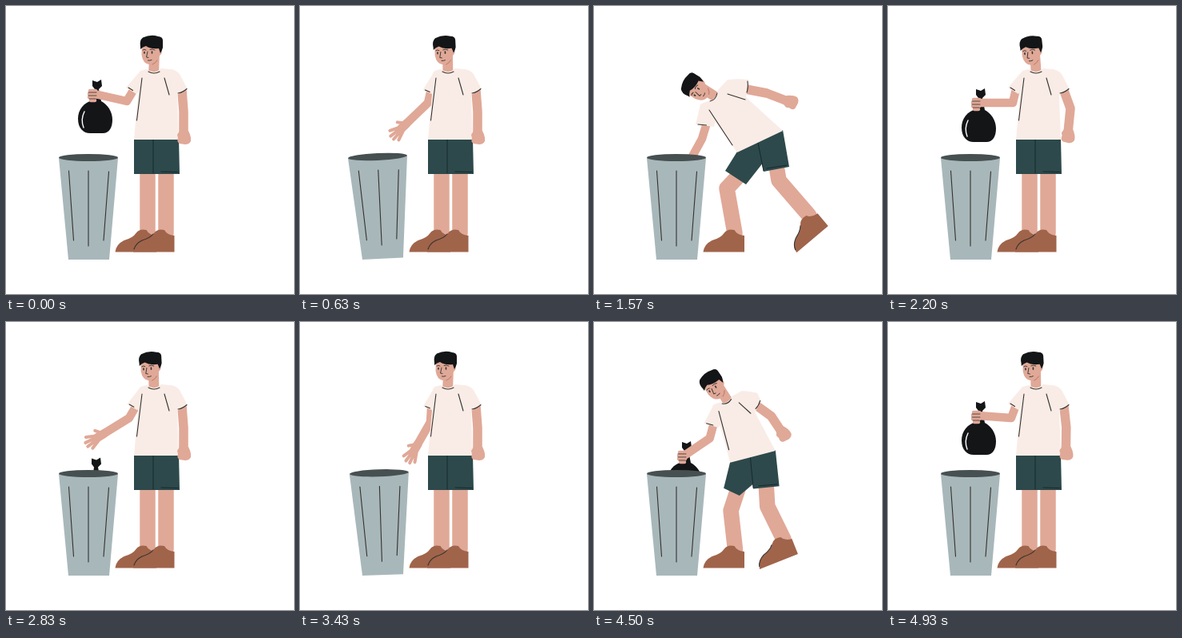
Write an HTML page with a canvas that moves like this. It is 360x360 px and loops after 5 s.

```html
<!DOCTYPE html>
<html lang="en">
<head>
<meta charset="utf-8">
<title>Taking out the rubbish</title>
<style>
  html, body { margin: 0; height: 100%; overflow: hidden; background: #fff; }
  canvas { display: block; }
</style>
</head>
<body>
<canvas width="360" height="360"></canvas>
<script>
const ctx = document.querySelector('canvas').getContext('2d');
const CYCLE = 2500, RELEASE = 180, FALL = 180, GRAB = 1700;
const SKIN = '#e0a897', SHIRT = '#f9ece6', SHORTS = '#2d494b', SHOE = '#a0644a',
      BIN = '#a8b7ba', RIM = '#465051', INK = '#35322f', BLACK = '#131517';

const numbers = s => String(s).match(/-?[\d.]+/g).map(Number);

// Blend two strings that differ only in their numbers.
const mix = (a, b, k) => {
  const to = numbers(b);
  let i = 0;
  return String(a).replace(/-?[\d.]+/g, n => (+n + (to[i++] - n) * k).toFixed(2));
};

// Eased value at time t from [time, value] keys.
const track = (t, keys) => {
  const i = keys.findIndex(key => key[0] > t);
  if (i < 0) return keys[keys.length - 1][1];
  if (i === 0) return keys[0][1];
  const [t0, a] = keys[i - 1], [t1, b] = keys[i];
  const u = (t - t0) / (t1 - t0);
  return mix(a, b, u * u * (3 - 2 * u));
};

const fill = (d, color) => {
  ctx.fillStyle = color;
  ctx.fill(new Path2D(d));
};
const line = (d, color = INK, width = 1.1) => {
  ctx.strokeStyle = color;
  ctx.lineWidth = width;
  ctx.stroke(new Path2D(d));
};
const at = (x, y, degrees, draw) => {
  ctx.save();
  ctx.translate(x, y);
  ctx.rotate(degrees * Math.PI / 180);
  draw();
  ctx.restore();
};

// Tip of a limb path and the direction of its last bone (0 = straight down).
const tip = limb => {
  const [ex, ey, x, y] = numbers(limb).slice(-4);
  return [x, y, Math.atan2(ex - x, y - ey) * 180 / Math.PI];
};

const bendKeys = [[1330, 0], [1520, 1.07], [1580, 1], [1840, 1], [2180, 0]];
const headKeys = [[0, 0], [300, -3], [630, -3], [930, 0], [1600, 0], [1800, -6], [2200, -6], [2430, -3], [2500, 0]];
const hipArmKeys = [
  [0, 'M220 106 L222 132 L222 160'], [1600, 'M220 106 L222 132 L222 160'],
  [1800, 'M220 106 L228 128 L225 158'], [2200, 'M220 106 L228 128 L225 158'],
  [2500, 'M220 106 L222 132 L222 160']
];
const bagArmKeys = [
  [0, 'M160 104 L151 119 L111 110'], [130, 'M160 104 L150 117 L108 105'],
  [340, 'M162 106 L154 120 L122 140'], [630, 'M163 108 L160 121 L133 147'],
  [930, 'M164 108 L163 125 L147 153'], [1300, 'M164 108 L164 127 L153 157'],
  [1600, 'M164 108 L164 127 L153 157'], [1800, 'M160 104 L156 121 L113 121'],
  [2200, 'M160 104 L156 121 L113 121'], [2430, 'M160 104 L154 120 L113 117'],
  [2500, 'M160 104 L151 119 L111 110']
];
const sleeveKeys = [
  [0, 'M169 80 L150 102 L163 110 L172 100Z'], [130, 'M169 80 L150 102 L163 110 L172 100Z'],
  [630, 'M169 80 L153.5 105 L167 111 L172 100Z'], [1600, 'M169 80 L155 107 L167 111 L172 100Z'],
  [1800, 'M169 80 L150 102 L163 110 L172 100Z']
];

function shoe(outlined) {
  fill('M0.5 0.5 L-51 0.5 Q-50 -9 -40 -14 Q-29 -17 -25 -23 Q-21 -29 -12 -27 Q-9 -21 0.5 -20Z', SHOE);
  if (outlined) line('M-50 -3 Q-48 -10 -40 -14 Q-30 -17 -26 -22');
}

function head() {
  fill('M179 66 L192 56 L191 86 L178 86Z', SKIN);
  fill('M170 48 L169.5 61 Q171 72 179 73 Q187 72 192 62 Q196 59 194 54 L192 47Z', SKIN);
  fill('M168 51 Q166.5 43 171 39.5 Q181 35 190 38 Q196 38.5 196 43 L196 52 Q195 56 193 59 L191 53 Q181 54 175 50 Q171 51 168 54Z', BLACK);
  line('M171 55 Q173 53.5 175 55 M180 54.5 Q183 53 186 55', INK, 0.9);
  line('M173 57.5 V59 M182.5 57 V59', INK, 1.6);
  line('M177 57 L175.5 64 L178 64.5 M177.5 68 Q180 68.5 182 67.5', INK, 0.9);
  line('M183 73 Q187 71.5 189 68', '#b97764', 0.9);
}

function bag() {
  fill('M-2 8 C-14 10 -21 20 -21 31 C-21 43 -14 49 -6 49 L10 49 C18 49 22 42 22 32 C22 22 16 13 8 9 L5 -6 L9 -10 L8 -18 L3 -15 L-3 -17 L-3 -10 L0 -6Z', BLACK);
  line('M-13 22 Q-18 32 -14 42', '#fff', 1.4);
}

function fist() {
  line('M-6 -4 H1 M-7 0 H1 M-7 4 H1 M-5 8 H0', SKIN, 4.5);
  line('M-8 -2 H2 M-8 2 H2 M-7 6 H1', INK, 0.8);
}

function openHand() {
  line('M0 0 V9', SKIN, 11);
  line('M-3 10 L-8 21 M-1 12 L-2.5 25 M2 12 L3 25 M4 10 L8 21 M-3 2 L-9 7', SKIN, 4);
}

function bin() {
  fill('M-12 -127 L62 -127 L51 0 L0 0Z', BIN);
  ctx.beginPath();
  ctx.ellipse(25, -127.5, 37, 4.5, 0, 0, 7);
  ctx.fillStyle = RIM;
  ctx.fill();
  line('M0.5 -111 L6.5 -24 M25 -111 V-17 M50.5 -110 L44 -24');
}

function draw(t) {
  const bend = +track(t, bendKeys);
  const pose = (upright, bent) => mix(upright, bent, bend);
  const hipArm = pose(track(t, hipArmKeys), 'M190 104 L216 109 L242 119');
  const bagArm = pose(track(t, bagArmKeys), 'M141 146 L135 166 L113 206');
  const sleeve = pose(track(t, sleeveKeys), 'M133 123 L127 148 L150 151 L155 132Z');
  const [handX, handY, handAngle] = tip(bagArm);
  const holding = t < RELEASE || t > GRAB;

  ctx.fillStyle = '#fff';
  ctx.fillRect(0, 0, 360, 360);
  ctx.lineCap = ctx.lineJoin = 'round';

  line(pose('M177 205 L177 245 L177 284', 'M183 210 L166 228 L176 284'), SKIN, 19.5);
  at(187.5, 307, 0, () => shoe(false));
  line(pose('M200 205 L200 245 L200 284', 'M228 200 L231 218 L269 262'), SKIN, 19.5);
  at(...numbers(pose('210 307 0', '292 275 -40')), () => shoe(true));

  fill(pose('M160 166 L185 166 L185 210 L172 210 L160 210Z', 'M179 182 L207 169 L212 195 L190 223 L164 206Z'), SHORTS);
  fill(pose('M184 166 L216 166 L217 210 L184 210Z', 'M204 170 L236 155 L244 201 L212 207Z'), SHORTS);
  line(pose('M184 167 L184 209 M194 207 L215 207.5', 'M205 171 L212 206 M216 203 L241 199'), '#172a2c', 1);

  const [neckX, neckY, tilt] = numbers(pose(`185 78 ${track(t, headKeys)}`, '149 111.5 -59'));
  at(neckX, neckY, tilt, () => {
    ctx.translate(-185, -78);
    head();
  });

  const fall = (t - RELEASE) / FALL;
  if (holding) at(handX, handY, 0, bag);
  else if (fall < 1) {
    const [x, y] = tip(track(RELEASE, bagArmKeys));
    at(x, y + 110 * fall ** 2, 0, bag);
  }
  line(bagArm, SKIN, 10.5);
  if (holding) at(handX, handY, 0, fist);
  else at(handX, handY, handAngle, openHand);

  fill(sleeve, SHIRT);
  fill(pose(
    'M176 79 Q185 86 194 78 L205 79 Q214 80 216 86 L214 112 L216 167 L160 167 L165 110 L166 84 Q168 80 176 79Z',
    'M143 119 Q152 118 155 105 L166 93 Q172 91 180 97 L191 115 L236 156 L179 183 L150 142 L133 123 Q138 120 143 119Z'), SHIRT);

  line(hipArm, SKIN, 11.5);
  at(...tip(hipArm), () => fill('M-5 -4 L6 -4 Q10 4 9 9 Q7 13 2 13 L-5 12 Q-9 10 -7 5 L-8 1Z', SKIN));
  fill(pose('M205 79 Q213 80 217 85 L227 104 L214 111 L208 95Z', 'M166 93 Q174 90 193 92 L193 94 L190 115 L172 108Z'), SHIRT);

  line(pose(
    'M178 82 Q185 86 192 82 M170 90 L163.5 143 M198 90 L204 111 M215 109 Q221 108 226 103.5',
    'M145 119 Q152 118 154 109 M144 130 L173 174 M167 110 L189 117 M191 108 Q193 102 192 94'));
  const [, , hemX, hemY, hemX2, hemY2] = numbers(sleeve);
  line(`M${hemX + 3} ${hemY} L${(hemX + hemX2) / 2 + 2} ${(hemY + hemY2) / 2 - 0.5}`);

  const sway = t > 340 && t < 1150 ? Math.sin(Math.PI * (t - 340) / 810) ** 2 : 0;
  at(78, 317, -3.3 * sway, bin);
}

const start = performance.now();
function tick() {
  draw((performance.now() - start) % CYCLE);
  requestAnimationFrame(tick);
}
tick();
</script>
</body>
</html>
```
